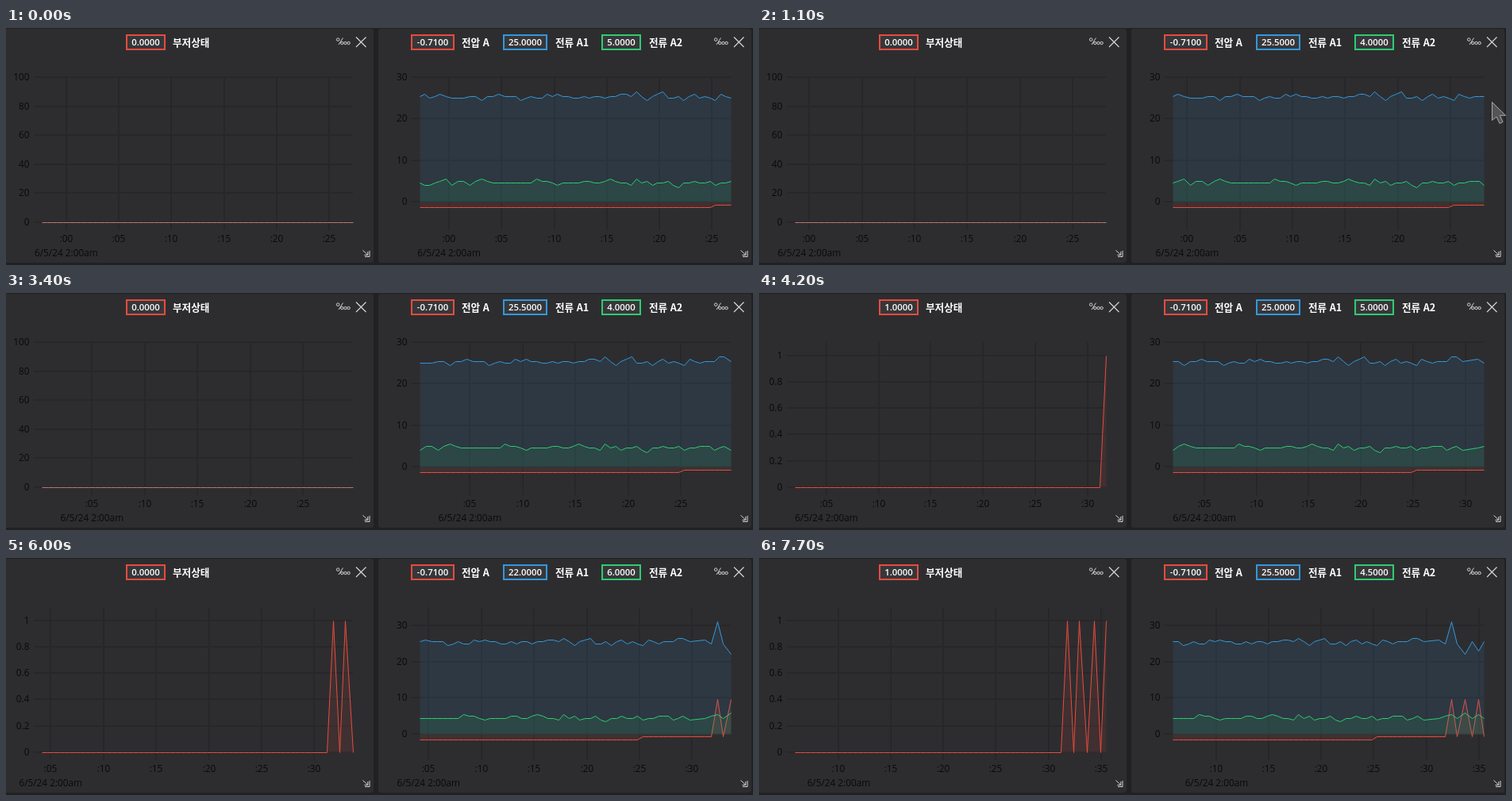
An HTML page for the animation above (8 s loop, 941 by 299 pixels).

```html
<!DOCTYPE html>
<html lang="ko">
<head>
<meta charset="utf-8">
<title>Live charts</title>
<style>
html, body { margin: 0; width: 100%; height: 100%; overflow: hidden; background: #212123; }
svg { display: block; width: 941px; height: 299px; }
.axis { font: 11.8px "Open Sans", "Noto Sans", sans-serif; fill: #0a0a0a; }
.value { font: 600 11.4px "Open Sans", "Noto Sans", sans-serif; fill: #fff; text-anchor: middle; }
.name { font: 700 12.6px "Noto Sans CJK KR", "Noto Sans CJK", "Noto Sans", sans-serif; fill: #fff; }
.mid { text-anchor: middle; }
.end { text-anchor: end; }
.grid { stroke: #000; stroke-opacity: .13; stroke-width: 2; fill: none; }
.icon { stroke: #d4d4d4; fill: none; }
</style>
</head>
<body>
<svg viewBox="0 0 941 299" id="stage"></svg>
<script>
const LOOP = 8000, SPAN = 30;
const X0 = 45, X1 = 437, TOP = 62, BOTTOM = 245, SHIFT = 476;
const RED = '#e74c3c', BLUE = '#3498db', GREEN = '#2ecc71';

const FIRST = 58, LAST = 72;  // newest sample at the start and end of the loop
const STEP_UP = 55, BUZZ = 66; // voltage step, first buzzer pulse

// sampling runs at a steady pace between these [index, seconds] points
const pace = [[0, -2.8], [4, -.92], [9, 1.96], [16, 5.8], [58, 26.8], [63, 29.1],
  [64, 29.75], [65, 31.2], [68, 32.93], [70, 34.38], [72, 35.49]];

function sampleTime(i) {
  const k = Math.max(1, pace.findIndex(p => p[0] >= i));
  const [i0, t0] = pace[k - 1], [i1, t1] = pace[k];
  return t0 + (t1 - t0) * (i - i0) / (i1 - i0);
}

function random(seed) {
  return () => (seed = (seed * 16807) % 2147483647) / 2147483647;
}

// a reading that jitters in half units, ending in the given values
function reading(base, seed, recent) {
  const rnd = random(seed);
  const noise = () => Math.round((base + (rnd() + rnd() - 1) * 1.2) * 2) / 2;
  return [...Array.from({ length: FIRST }, noise), ...recent];
}

const times = Array.from({ length: LAST + 1 }, (_, i) => sampleTime(i));
const amps1 = reading(25.5, 4211, [25, 25.5, 25.5, 25.5, 26.5, 26.5, 25.5, 26, 25, 31, 25, 22, 25.5, 23, 25.5]);
const amps2 = reading(4.7, 9173, [5, 5, 5, 4, 4.5, 5, 4, 4.5, 5, 5.5, 4.5, 6, 4.5, 5.5, 4.5]);
const volts = times.map((_, i) => i < STEP_UP ? -1.42 : i > BUZZ && i % 2 ? 9.7 : -.71);
const buzzer = times.map((_, i) => i >= BUZZ && i % 2 === 0 ? 1 : 0);

// samples arrive a little faster than real time; the right panel lags
const RATE = 1.095, LAG = 60;
const arrival = i => (times[i] - times[FIRST + 1]) / RATE * 1000;
function newest(ms) {
  let i = FIRST;
  while (i < LAST && arrival(i + 1) <= ms) i++;
  return i;
}

const n = v => +v.toFixed(2);
const snap = v => Math.round(v) + .5;
const line = (x1, y1, x2, y2) => `M${x1},${y1}L${x2},${y2}`;
const text = (x, y, cls, s) => `<text x="${n(x)}" y="${n(y)}" class="${cls}">${s}</text>`;

function legend(x, w, color, value, nameX, name) {
  return `<rect x="${x + 1}" y="9" width="${w - 2}" height="18" fill="#37373a" stroke="${color}" stroke-width="2"/>` +
    text(x + w / 2, 22.3, 'value', value.toFixed(4)) + text(nameX, 22.6, 'name', name);
}

function chart(last, series, lo, hi, step) {
  const end = times[last];
  const first = times.findIndex(t => t >= end - SPAN);
  const start = times[first];
  const px = t => X0 + (t - start) / (end - start) * (X1 - X0);
  const py = v => BOTTOM - (v - lo) / (hi - lo) * (BOTTOM - TOP);
  let grid = '', labels = '', plot = '';

  for (let v = 0; v <= hi; v += step) {
    const y = Math.round(py(v));
    grid += line(X0 - 10, y, X1, y);
    labels += text(29.5, y + 4.2, 'axis end', +v.toFixed(1));
  }
  const tick = Math.ceil(start / 5) * 5;
  for (let t = tick; t <= end; t += 5) {
    const x = Math.round(px(t));
    grid += line(x, TOP, x, BOTTOM + 10);
    labels += text(x, 270, 'axis mid', ':' + String(t).padStart(2, '0'));
  }
  labels += text(px(tick), 288, 'axis mid', '6/5/24 2:00am');

  const zero = snap(py(0));
  for (const [data, color, stroke = color] of series) {
    let pts = '';
    for (let i = first; i <= last; i++) pts += `${snap(px(times[i]))},${snap(py(data[i]))} `;
    plot += `<polygon points="${snap(X0)},${zero} ${pts}${snap(X1)},${zero}" fill="${color}" fill-opacity=".1"/>` +
      `<polyline points="${pts}" fill="none" stroke="${stroke}"/>`;
  }
  return `<path class="grid" d="${grid}"/>${labels}${plot}`;
}

const icons = `<g class="icon">
  <circle cx="418.2" cy="14.6" r="1.8"/><path d="M424.5 12.5L419 21"/>
  <circle cx="423.3" cy="19" r="1.7"/><circle cx="427.5" cy="19" r="1.7"/><circle cx="431.6" cy="19" r="1.7"/>
  <path d="M441 11.5L453.5 24M453.5 11.5L441 24" stroke-width="1.2"/>
  <path d="M449.5 280.5L455.5 286M451.5 286.5H455.8V282M452 288.5H458V281"/></g>`;

document.getElementById('stage').innerHTML = `
  <rect x="-4" y="1" width="467" height="295" rx="3" fill="#2d2d30"/>
  <rect x="469" y="1" width="470" height="295" rx="3" fill="#2d2d30"/>
  <g id="left"></g><g id="right"></g>
  ${icons}<g transform="translate(${SHIFT})">${icons}</g>
  <path id="pointer" d="M0,0V23L5.5,18.5L9.5,27L13.5,25L9.8,16.8H17Z" fill="#555558" stroke="#a8a8a8"/>`;
const [left, right, pointer] = ['left', 'right', 'pointer'].map(id => document.getElementById(id));

function drawLeft(last) {
  const active = last >= BUZZ;
  left.innerHTML = legend(151, 50, RED, buzzer[last], 210, '부저상태') +
    chart(last, [[buzzer, RED, active ? RED : '#b87b6e']], 0, active ? 1.1 : 100, active ? .2 : 20);
}

function drawRight(last) {
  const hi = last > BUZZ ? 35 : 30;
  right.innerHTML = legend(510, 55, RED, -.71, 574, '전압 A') +
    legend(626, 56, BLUE, amps1[last], 692, '전류 A1') +
    legend(750, 50, GREEN, amps2[last], 810, '전류 A2') +
    `<g transform="translate(${SHIFT})">` +
    chart(last, [[volts, RED], [amps1, BLUE], [amps2, GREEN]], -5, hi, 10) + '</g>';
}

let shownLeft, shownRight;
function render(ms) {
  const l = newest(ms), r = newest(ms - LAG);
  if (l !== shownLeft) drawLeft(shownLeft = l);
  if (r !== shownRight) drawRight(shownRight = r);

  // the pointer slides in from the right edge and out again
  const t = Math.floor(ms / 100) * 100;
  const away = t < 1100 ? (1100 - t) * .1 : Math.max(0, t - 1200) * .07;
  pointer.setAttribute('transform', `translate(${923.5 + away},${93.5 + away * .4})`);
  pointer.setAttribute('visibility', t >= 1000 && t < 1500 ? 'visible' : 'hidden');
}

const begin = performance.now();
function frame() {
  render((performance.now() - begin) % LOOP);
  requestAnimationFrame(frame);
}
frame();
</script>
</body>
</html>
```
